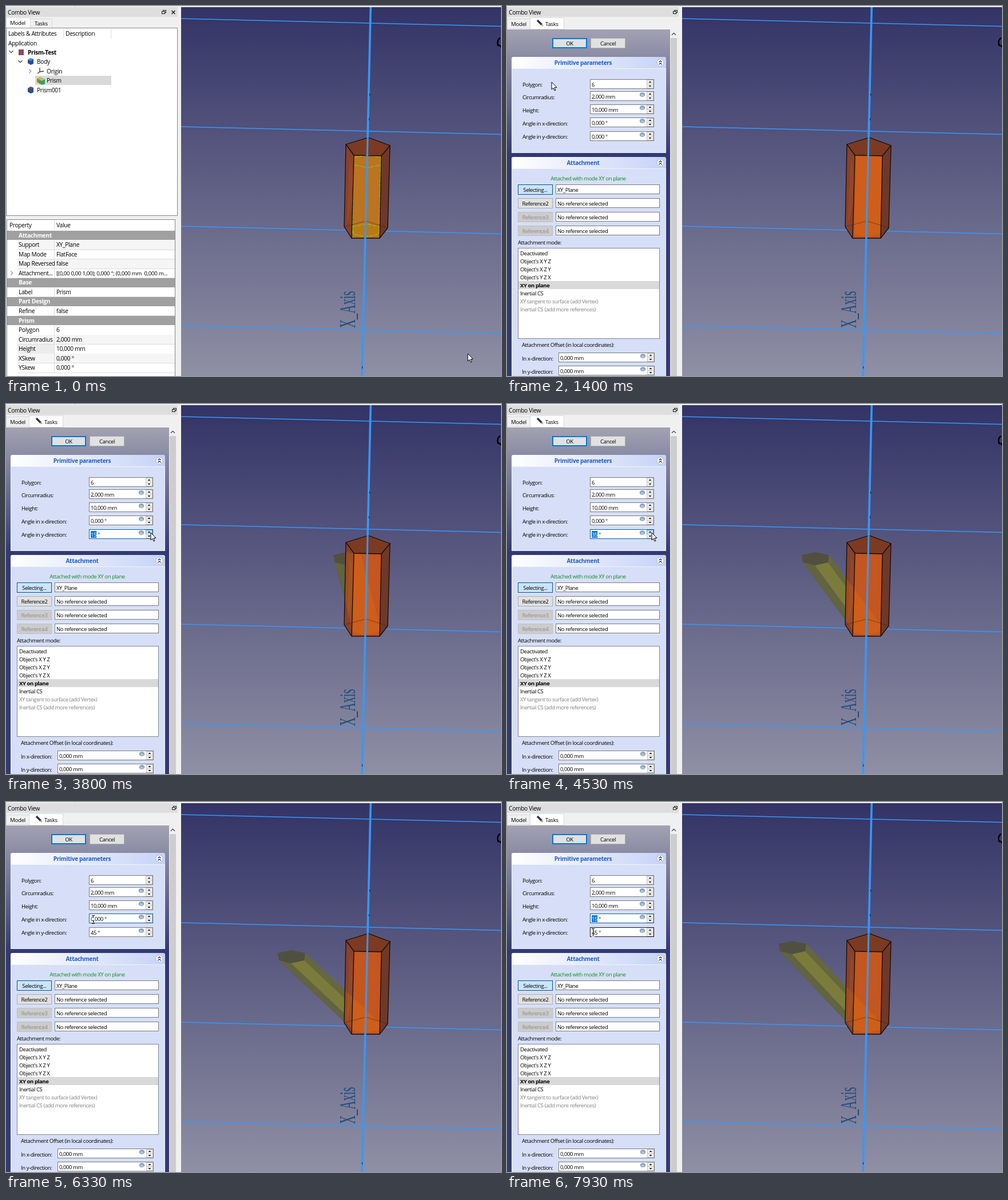
Write an HTML page with a canvas that moves like this. It is 865x647 px and loops after 8 s.

```html
<!DOCTYPE html>
<html lang="en">
<head>
<meta charset="utf-8">
<title>Prism skew</title>
<style>
  html, body { margin: 0; width: 100%; height: 100%; overflow: hidden; background: #f0f0f0; }
  canvas { display: block; width: 865px; height: 647px; }
</style>
</head>
<body>
<canvas id="stage" width="865" height="647"></canvas>
<script>
const ctx = document.getElementById('stage').getContext('2d');
const LOOP = 8000;
const BLUE = '#3399ff';

// ---------- helpers ----------
function rect(x, y, w, h, fill, stroke) {
  if (fill) { ctx.fillStyle = fill; ctx.fillRect(x, y, w, h); }
  if (stroke) {
    ctx.strokeStyle = stroke;
    ctx.lineWidth = 1;
    ctx.strokeRect(x + .5, y + .5, w - 1, h - 1);
  }
}

function text(s, x, y, o = {}) {
  const size = o.size || 10.2;
  ctx.font = `${o.bold ? 'bold ' : ''}${size}px "Open Sans", "Noto Sans", sans-serif`;
  ctx.letterSpacing = (o.gap ?? -.3) + 'px';
  ctx.textAlign = o.align || 'left';
  ctx.fillStyle = o.color || '#000';
  ctx.fillText(s, x, y + 3.6);
}

const small = (s, x, y, o = {}) => text(s, x, y, { size: 9.5, gap: -.4, ...o });

function trace(pts, close) {
  ctx.beginPath();
  pts.forEach(([x, y], i) => i ? ctx.lineTo(x, y) : ctx.moveTo(x, y));
  if (close) ctx.closePath();
}

function poly(pts, fill) {
  trace(pts, true);
  ctx.fillStyle = fill;
  ctx.fill();
}

function line(pts, color, width = 1, close = false) {
  trace(pts, close);
  ctx.strokeStyle = color;
  ctx.lineWidth = width;
  ctx.stroke();
}

function chevron(x, y, dir, color = '#404040', r = 3.5) {
  const h = r / 2;
  const shapes = {
    down: [[x - r, y - h], [x, y + h], [x + r, y - h]],
    up: [[x - r, y + h], [x, y - h], [x + r, y + h]],
    right: [[x - h, y - r], [x + h, y], [x - h, y + r]]
  };
  line(shapes[dir], color, 1.2);
}

function vertical(y0, y1, a, b) {
  const g = ctx.createLinearGradient(0, y0, 0, y1);
  g.addColorStop(0, a);
  g.addColorStop(1, b);
  return g;
}

// ---------- timeline ----------
const lastValue = (steps, t) => steps.reduce((v, [at, val]) => t >= at ? val : v, 0);

const Y_CLICKS = [2860, 3260, 3790, 3925, 4125, 4260, 4525, 4725, 4925].map((t, i) => [t, 5 * (i + 1)]);
const X_CLICKS = [[6860, 5], [6990, 10], [7195, 15]];

// time, x, y
const PATH = [
  [460, 34, 140], [530, 44, 142], [860, 78, 133], [1660, 78, 133], [1800, 110, 150],
  [2100, 226, 214], [2270, 248, 231], [2465, 253, 225], [5260, 253, 225],
  [5530, 153, 226], [5700, 153, 226], [6060, 151, 205], [6300, 151, 205],
  [6790, 251, 201], [7300, 251, 201], [7780, 152, 227], [7930, 150, 228]
];

function pointer(t) {
  if (t < 65) return [807, 608];
  if (t < 130) return [470, 425];
  if (t < 195) return [140, 246];
  if (t < 460) return null;
  const i = PATH.findIndex(p => p[0] > t);
  if (i < 0) return PATH[PATH.length - 1].slice(1);
  const [t0, x0, y0] = PATH[i - 1], [t1, x1, y1] = PATH[i];
  const u = (t - t0) / (t1 - t0), k = u * u * (3 - 2 * u);
  return [x0 + (x1 - x0) * k, y0 + (y1 - y0) * k];
}

// ---------- 3D view ----------
const TOP = [[594, 242], [633, 230], [671, 244], [656, 262], [608, 261]];
const BOTTOM = [[591, 386], [629, 376], [667, 388], [653, 406], [604, 406]];
const FRONT = [TOP[4], TOP[3], BOTTOM[3], BOTTOM[4]];
const OUTLINE = [TOP[0], TOP[1], TOP[2], BOTTOM[2], BOTTOM[3], BOTTOM[4], BOTTOM[0]];
const HEX = [[-24, -6], [0, -11], [24, -6], [22, 7], [-1, 12], [-22, 7]];

const hexAt = (cx, cy) => HEX.map(([x, y]) => [cx + x, cy + y]);
const tan = deg => Math.tan(deg * Math.PI / 180);

function skewedPrism(ax, ay) {
  const top = hexAt(632 - 133 * tan(ay), 270 - 60 * tan(ax));
  const base = hexAt(629, 392);
  const face = (i, j, c) => poly([top[i], top[j], base[j], base[i]], c);
  face(0, 5, '#5c5d40');
  face(2, 3, '#66673f');
  face(5, 4, '#62633f');
  face(4, 3, '#7b7b3c');
  poly(top, '#515040');
  return { top, base };
}

function grid() {
  [22, 211, 385, 559].forEach(y => line([[306, y], [865, y + 13.5]], BLUE, 1.5));
}

function axisLabel() {
  ctx.save();
  ctx.translate(610, 563);
  ctx.rotate(-Math.PI / 2);
  ctx.scale(.52, 1);
  ctx.font = '40px "Liberation Serif", "Noto Serif", serif';
  ctx.letterSpacing = '0px';
  ctx.textAlign = 'left';
  ctx.fillStyle = '#1f4d7c';
  ctx.fillText('X_Axis', 0, 0);
  ctx.restore();
}

function axis(dashed) {
  const at = y => [y < 230 ? 637.3 - y * .023 : 632 - (y - 230) * .024, y];
  const top = at(2), mid = at(230), low = at(406), end = at(647);
  line([top, mid], BLUE, 3.6);
  line([mid, at(262)], BLUE, 3);
  if (dashed) ctx.setLineDash([6, 4]);
  line([at(262), low], BLUE, dashed ? 2 : 3.2);
  ctx.setLineDash([]);
  line([low, end], BLUE, 3.6);
  rect(635, 153, 1, 4, '#123');
  rect(634, 196, 1, 4, '#123');
  rect(622, 630, 1, 4, '#123');
}

function bigPrism(front) {
  poly(OUTLINE, '#74391f');
  poly([TOP[0], TOP[4], BOTTOM[4], BOTTOM[0]], '#87412a');
  poly([[601, 262], [607, 290], [604, 350], [595, 384]], '#93472a');
  poly([TOP[3], TOP[2], BOTTOM[2], BOTTOM[3]], '#6f3828');
  poly(TOP, '#7c3a22');
  poly(FRONT, front);
}

function bigEdges() {
  line(BOTTOM.slice(0, 3), 'rgba(60,25,10,.5)', 1);
  line([BOTTOM[0], BOTTOM[4], BOTTOM[3], BOTTOM[2]], '#140c08', 1.3);
  line(TOP, '#140c08', 1.3, true);
  [0, 2, 3, 4].forEach(i => line([TOP[i], BOTTOM[i]], '#140c08', 1.3));
}

function innerPrism(picked) {
  const top = hexAt(632, 271), base = hexAt(629, 392);
  if (picked) {
    poly([top[0], top[1], top[2], base[3], base[4], base[5]], '#b9a428');
    poly(top, '#93801b');
    poly(base, '#a58e20');
    ctx.fillStyle = '#d2bd32';
    for (let y = 288; y < 380; y += 8)
      for (let x = 611 + y % 3; x < 652; x += 8) ctx.fillRect(x, y, 1, 1);
    line([top[0], top[1], top[2], base[3], base[4], base[5]], '#fbf32a', 1.7, true);
    line([top[5], top[4], top[3]], '#d9cd28', 1);
    line([base[0], base[1], base[2]], '#d9cd28', 1);
  } else {
    const green = '#8fd01c';
    poly(base, '#b97a16');
    ctx.setLineDash([7, 2]);
    line([[609, 265], top[1], [655, 265]], green);
    line([top[5], top[4], top[3]], green);
    line(base, green, 1, true);
    line([[655, 266], [652, 398]], green);
    line([[608, 266], [605, 398]], green);
    ctx.setLineDash([]);
  }
}

function view3d(t, dialog, ax, ay) {
  ctx.save();
  ctx.beginPath();
  ctx.rect(306, 2, 559, 645);
  ctx.clip();
  rect(306, 2, 559, 645, vertical(2, 647, '#333366', '#8f8fa5'));
  axisLabel();
  grid();
  ctx.strokeStyle = '#000';
  ctx.lineWidth = 2.5;
  ctx.beginPath();
  ctx.arc(869, 64, 10, 2.5, 4.1);
  ctx.stroke();
  poly([[858, 66], [865, 69], [865, 73]], '#000');

  const picked = t >= 1060;
  if (dialog) {
    const { top, base } = skewedPrism(ax, ay);
    bigPrism('#c4561f');
    ctx.save();
    trace(OUTLINE, true);
    ctx.clip();
    ctx.globalAlpha = .16;
    poly([top[0], top[1], top[2], base[2], base[3], base[4], base[5], top[5]], '#ff8a00');
    ctx.restore();
  } else {
    bigPrism('#bb741f');
    innerPrism(picked);
  }
  bigEdges();
  axis(!dialog && picked);
  ctx.restore();
}

// ---------- model tab ----------
function cube(x, y, c, top) {
  poly([[x - 5, y - 3], [x, y - 6], [x + 5, y - 4], [x + 5, y + 4], [x, y + 6], [x - 5, y + 3]], c);
  poly([[x - 5, y - 3], [x, y - 6], [x + 5, y - 4], [x, y - 1]], top);
}

function floatIcon(x) {
  rect(x - 1, 7, 6, 5, null, '#222');
  rect(x - 3, 9, 6, 5, '#e0e0e0', '#222');
}

const PROPS = [
  ['Attachment'], ['Support', 'XY_Plane'], ['Map Mode', 'FlatFace'], ['Map Reversed', 'false'],
  ['Attachment...', '[(0,00 0,00 1,00); 0,000 °; (0,000 mm  0,000 m...'],
  ['Base'], ['Label', 'Prism'], ['Part Design'], ['Refine', 'false'], ['Prism'],
  ['Polygon', '6'], ['Circumradius', '2,000 mm'], ['Height', '10,000 mm'],
  ['XSkew', '0,000 °'], ['YSkew', '0,000 °']
];

function properties() {
  rect(1, 373, 295, 280, '#fff', '#828790');
  text('Property', 6, 383);
  text('Value', 88, 383);
  rect(84, 374, 1, 18, '#d8d8d8');
  PROPS.forEach(([name, value], i) => {
    const y = 401 + i * 16.55, top = Math.round(y - 8);
    if (value === undefined) {
      rect(2, top, 293, 16, '#a0a0a0');
      text(name, 22, y, { bold: true, color: '#fff' });
      return;
    }
    if ([1, 3, 11, 13].includes(i)) rect(20, top, 275, 16, '#f5f5f5');
    if (name === 'Height') rect(20, top, 64, 16, '#ececec');
    rect(20, top + 16, 275, 1, '#dcdcdc');
    rect(84, top, 1, 17, '#dcdcdc');
    text(name, 22, y);
    text(value, 88, y, value.length > 20 ? { size: 9.8, gap: -.35 } : {});
  });
  chevron(10, 467, 'right', '#999');
}

function modelTab(t) {
  floatIcon(275);
  line([[289.5, 8], [295.5, 14]], '#222', 1.5);
  line([[295.5, 8], [289.5, 14]], '#222', 1.5);
  rect(42, 22, 39, 17, '#f0f0f0', '#d9d9d9');
  rect(0, 20, 43, 20, '#fff', '#d9d9d9');
  text('Model', 7, 29, { size: 9.7 });
  text('Tasks', 50, 30, { size: 9.7 });

  rect(0, 38, 300, 329, '#fff', '#828790');
  text('Labels & Attributes', 4, 48);
  text('Description', 104, 48);
  rect(100, 40, 1, 17, '#dedede');
  rect(183, 40, 1, 17, '#dedede');
  text('Application', 4, 65);

  if (t < 600) rect(51, 122, 133, 16, '#d9d9d9');
  else rect(51, 122, 133, 16, '#cce8ff', '#99d1ff');
  if (t >= 1060) {
    ctx.setLineDash([1, 1]);
    rect(52, 122, 48, 16, null, '#222');
    ctx.setLineDash([]);
  }
  chevron(9, 80, 'down');
  chevron(25, 97, 'down');
  chevron(42, 114, 'right', '#999');
  rect(22, 76, 9, 10, '#8a4a5a');
  text('Prism-Test', 38, 81, { bold: true });
  cube(43, 97, '#23528f', '#5b8cc8');
  text('Body', 54, 97);
  line([[59, 108], [59, 115], [66, 114]], '#333', 1.3);
  line([[59, 115], [55, 118]], '#8b2a2a', 1.5);
  text('Origin', 71, 114);
  cube(59, 130, '#8f8a2c', '#d8b63a');
  cube(63, 132, '#3f9a56', '#8bd49b');
  text('Prism', 71, 130);
  cube(43, 147, '#2a4f96', '#7d4a55');
  text('Prism001', 54, 147);
  properties();
}

// ---------- tasks tab ----------
function button(s, x, y, w, h, kind) {
  const looks = {
    main: ['#e1e1e1', '#0078d7', '#000'],
    plain: ['#e1e1e1', '#adadad', '#000'],
    on: ['#cce4f7', '#005499', '#000'],
    off: ['#cccccc', '#bfbfbf', '#8a8a8a']
  };
  const [fill, edge, color] = looks[kind];
  rect(x, y, w, h, fill, edge);
  if (kind === 'main') rect(x + 1, y + 1, w - 2, h - 2, null, edge);
  small(s, x + w / 2, y + h / 2, { align: 'center', color });
}

function section(title, y, h) {
  const g = ctx.createLinearGradient(8, 0, 278, 0);
  g.addColorStop(0, '#ffffff');
  g.addColorStop(1, '#c6d3f7');
  ctx.fillStyle = g;
  ctx.beginPath();
  ctx.roundRect(8, y, 270, 20, [3, 3, 0, 0]);
  ctx.fill();
  rect(8, y + 20, 270, h, '#d6dff7', '#eef2fc');
  text(title, 133, y + 10, { bold: true, size: 10, align: 'center', color: '#215dc6' });
  ctx.beginPath();
  ctx.arc(268, y + 10, 6, 0, 7);
  ctx.fillStyle = '#fff';
  ctx.fill();
  ctx.strokeStyle = '#a9b6dc';
  ctx.lineWidth = 1;
  ctx.stroke();
  chevron(268, y + 8, 'up', '#222', 2.5);
  chevron(268, y + 12, 'up', '#222', 2.5);
}

function spin(value, x, y, w, o = {}) {
  const top = y - 9, right = x + w;
  rect(x, top, w, 17, '#fff', o.edge || '#7a7a7a');
  rect(right - 13, top + 1, 12, 8, o.hot ? '#cce4f7' : '#f0f0f0', o.hot ? '#5aa7e0' : '#c4c4c4');
  rect(right - 13, top + 8, 12, 8, '#f0f0f0', '#c4c4c4');
  const cx = right - 7, cy = top + 8.5;
  poly([[cx - 2.5, cy - 2.5], [cx, cy - 5], [cx + 2.5, cy - 2.5]], '#111');
  poly([[cx - 2.5, cy + 2.5], [cx, cy + 5], [cx + 2.5, cy + 2.5]], '#111');
  if (!o.plain) {
    ctx.beginPath();
    ctx.ellipse(right - 20.5, y - 3, 4.8, 4, 0, 0, 7);
    ctx.fillStyle = '#8fa6bd';
    ctx.fill();
    small('fx', right - 20.5, y - 3.5, { size: 6, align: 'center', color: '#fff' });
  }
  if (!o.selected) return small(value, x + 3, y);
  const [digits, unit] = value.split(' ');
  const wide = digits.length * 5.1;
  rect(x + 3, top + 3, wide, 12, '#0078d7');
  small(digits, x + 3, y, { color: '#fff' });
  small(unit, x + 5 + wide, y);
}

const MODES = ['Deactivated', "Object's X Y Z", "Object's X Z Y", "Object's Y Z X", 'XY on plane',
  'Inertial CS', 'XY tangent to surface (add Vertex)', 'Inertial CS (add more references)'];

function tasksTab(t, ax, ay) {
  floatIcon(293);
  rect(0, 22, 41, 18, '#f0f0f0', '#d9d9d9');
  rect(40, 20, 60, 21, '#fff', '#d9d9d9');
  text('Model', 7, 31, { size: 9.7 });
  text('Tasks', 67, 31, { size: 9.7 });
  line([[53, 25], [61, 33]], '#28344f', 3.6);
  line([[60, 32], [63, 35]], '#c9a050', 2);

  rect(0, 41, 285, 606, vertical(41, 260, '#a2a2b2', '#333a70'));
  rect(285, 41, 13, 606, '#f0f0f0');
  rect(286, 56, 11, 591, '#cdcdcd');
  chevron(291.5, 49, 'up');
  button('OK', 79, 56, 61, 18, 'main');
  button('Cancel', 146, 56, 61, 18, 'plain');

  section('Primitive parameters', 89, 148);
  const onX = t >= 6125, onY = t >= 2860 && !onX;
  const value = (v, clicked) => clicked ? v + ' °' : '0,000 °';
  const edge = (focus, hover) => focus ? '#0f5fa8' : hover ? '#171717' : '#7a7a7a';
  ['Polygon:', 'Circumradius:', 'Height:', 'Angle in x-direction:', 'Angle in y-direction:']
    .forEach((s, i) => small(s, 27, [137, 159, 182, 205, 228][i]));
  spin('6', 145, 137, 112, { plain: true });
  spin('2,000 mm', 145, 158.5 | 0, 112);
  spin('10,000 mm', 145, 181, 112);
  spin(value(ax, ax > 0), 145, 204, 112, {
    selected: ax > 0, edge: edge(onX, t > 5850), hot: t > 6780 && t < 7330
  });
  spin(value(ay, ay > 0), 145, 228, 112, {
    selected: onY && ay > 0,
    edge: edge(onY, t > 2200 && !onX || t > 7650),
    hot: t > 2525 && t < 5300
  });

  section('Attachment', 264, 380);
  small('Attached with mode XY on plane', 142, 301, { align: 'center', color: '#128a2a' });
  [['Selecting...', 'on'], ['Reference2', 'plain'], ['Reference3', 'off'], ['Reference4', 'off']]
    .forEach(([s, kind], i) => {
      const y = 312 + i * 24;
      button(s, 19, y, 61, 18, kind);
      rect(85, y, 182, 17, '#fff', '#7a7a7a');
      small(i ? 'No reference selected' : 'XY_Plane', 88, y + 9);
    });
  small('Attachment mode:', 19, 413);
  rect(19, 423, 248, 159, '#fff', '#828790');
  MODES.forEach((s, i) => {
    const y = 432 + i * 14;
    if (i === 4) rect(20, y - 7, 246, 14, '#d9d9d9');
    small(s, 23, y, { bold: i === 4, color: i > 5 ? '#808080' : '#000' });
  });
  small('Attachment Offset (in local coordinates):', 26, 592);
  small('In x-direction:', 26, 616);
  small('In y-direction:', 26, 639);
  spin('0,000 mm', 90, 615, 168);
  spin('0,000 mm', 90, 638, 168);
}

// ---------- cursor ----------
function cursor(t) {
  const p = pointer(t);
  if (!p) return;
  const [x, y] = p;
  const beam = t > 1400 && x > 145 && x < 240 && y > 195 && y < 237;
  if (beam) {
    ctx.save();
    ctx.globalCompositeOperation = 'difference';
    const bx = Math.round(x), by = Math.round(y);
    rect(bx, by - 6, 1, 13, '#fff');
    rect(bx - 2, by - 7, 5, 1, '#fff');
    rect(bx - 2, by + 7, 5, 1, '#fff');
    ctx.restore();
    return;
  }
  const arrow = [[0, 0], [0, 13], [3, 10.3], [5, 15], [7, 14.1], [5, 9.6], [9, 9.4]]
    .map(([a, b]) => [x + a, y + b]);
  poly(arrow, '#fff');
  line(arrow, '#000', 1, true);
}

function draw(t) {
  const dialog = t >= 1395;
  const ax = lastValue(X_CLICKS, t), ay = lastValue(Y_CLICKS, t);
  rect(0, 0, 865, 647, '#f0f0f0');
  rect(120, 0, 1, 1, '#aaa');
  rect(0, 2, 300, 17, '#dedede');
  text('Combo View', 3, 11);
  if (dialog) tasksTab(t, ax, ay);
  else modelTab(t);
  view3d(t, dialog, ax, ay);
  cursor(t);
}

const start = performance.now();
function tick() {
  draw((performance.now() - start) % LOOP);
  requestAnimationFrame(tick);
}
tick();
</script>
</body>
</html>
```
